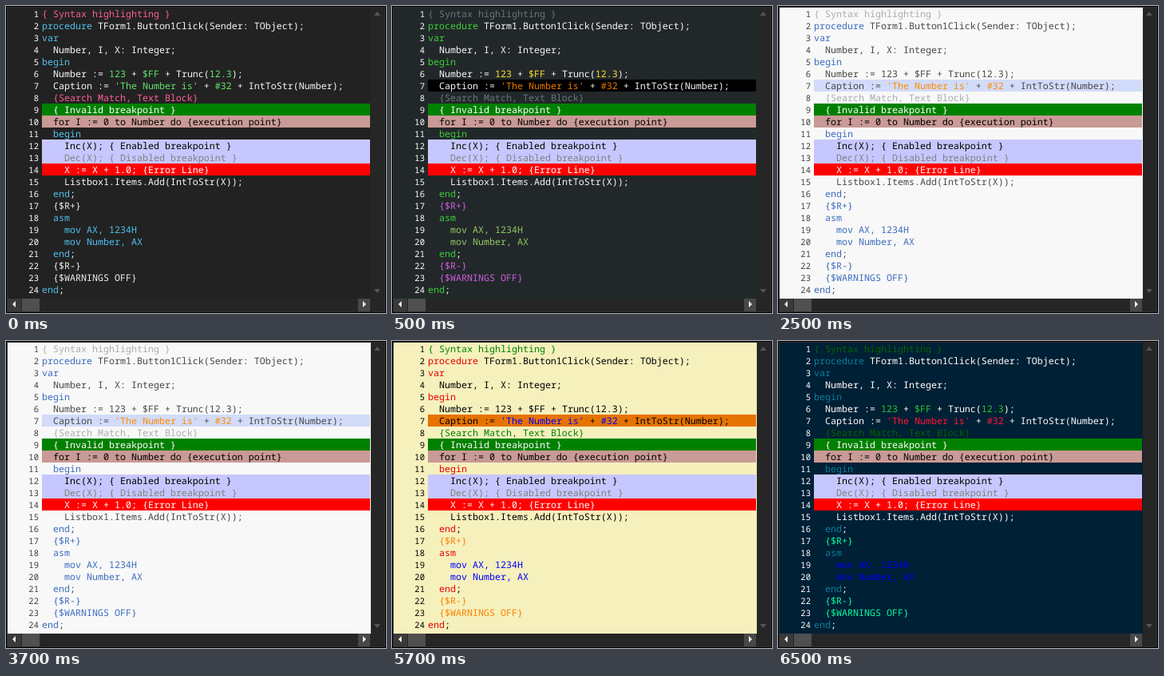
An HTML page for the animation above (8000 ms loop, 476 px wide and 384 px high).

```html
<!DOCTYPE html>
<html lang="en">
<head>
<meta charset="utf-8">
<title>Editor themes</title>
<style>
html, body { margin: 0; width: 100%; height: 100%; overflow: hidden; background: #000; }
svg { display: block; width: 476px; height: 384px; }
text {
  font-family: "Noto Sans Mono", "DejaVu Sans Mono", monospace;
  font-size: 11.667px;
  white-space: pre;
  text-rendering: geometricPrecision;
}
.num { font-size: 10.6px; text-anchor: end; }
</style>
</head>
<body>
<svg id="stage" viewBox="0 0 476 384" xmlns="http://www.w3.org/2000/svg"></svg>
<script>
const LOOP = 8000, ROW = 15, TOP = 2, LEFT = 45, CHAR = 7;
const stage = document.getElementById("stage");

const code = `{ Syntax highlighting }
procedure TForm1.Button1Click(Sender: TObject);
var
  Number, I, X: Integer;
begin
  Number := 123 + $FF + Trunc(12.3);
  Caption := 'The Number is' + #32 + IntToStr(Number);
  {Search Match, Text Block}
  { Invalid breakpoint }
  for I := 0 to Number do {execution point}
  begin
    Inc(X); { Enabled breakpoint }
    Dec(X); { Disabled breakpoint }
    X := X + 1.0; {Error Line}
    Listbox1.Items.Add(IntToStr(X));
  end;
  {$R+}
  asm
    mov AX, 1234H
    mov Number, AX
  end;
  {$R-}
  {$WARNINGS OFF}
end;`.split("\n");

// Rows whose colours are the same in every theme: [background, text]
const marked = {
  9: ["#008000", "#ffffff"],
  10: ["#c99a96", "#000000"],
  12: ["#c7c7ff", "#000000"],
  13: ["#c7c7ff", "#808080"],
  14: ["#ff0000", "#ffffff"]
};

const themes = [
  { at: 0, bg: "#222222", line: "#222222", gutter: "#ffffff", text: "#f8f8f8", key: "#4fc1f0",
    comment: "#ff5c9a", number: "#62e46c", string: "#62e46c", directive: "#f0f0f0", asm: "#4fc1f0" },
  { at: 500, bg: "#22282a", line: "#000000", gutter: "#ffffff", text: "#f8f8f8", key: "#3ad03a",
    comment: "#66747b", number: "#ffdc30", string: "#ec7600", directive: "#d05ce0", asm: "#93c763" },
  { at: 2500, bg: "#f8f8f8", line: "#d2dcfa", gutter: "#404040", text: "#484848", key: "#3c6cbe",
    comment: "#adadad", number: "#484848", string: "#ff8c00", directive: "#3c6cbe", asm: "#3c6cbe" },
  { at: 4500, bg: "#f5f0bc", line: "#e67300", gutter: "#000000", text: "#000000", key: "#ee0000",
    comment: "#008000", number: "#000000", string: "#0000ff", directive: "#ff8000", asm: "#0000ff" },
  { at: 6500, bg: "#002035", line: "#002035", gutter: "#ffffff", text: "#ffffff", key: "#087f9c",
    comment: "#006400", number: "#28c828", string: "#ff1438", directive: "#00ffa0", asm: "#0000ff" }
];

const token = /(?<directive>\{\$[^}]*\})|(?<comment>\{[^}]*\})|(?<string>'[^']*'|#\d+)|(?<number>\$[0-9A-F]+|\b\d+(?:\.\d+)?\b)|(?<key>\b(?:procedure|var|begin|end|asm)\b)/g;

function add(parent, tag, attrs, content) {
  const el = document.createElementNS("http://www.w3.org/2000/svg", tag);
  for (const name in attrs) el.setAttribute(name, attrs[name]);
  if (content) el.textContent = content;
  return parent.appendChild(el);
}

function rect(x, y, width, height, fill) {
  return add(stage, "rect", { x, y, width, height, fill });
}

const painted = [];
function themed(el, role) {
  painted.push([el, role]);
  return el;
}

function rowRect(n, fill) {
  return rect(LEFT, TOP + (n - 1) * ROW, 456 - LEFT, ROW, fill);
}

function drawRow(source, n) {
  const y = TOP + (n - 1) * ROW + 12;
  themed(add(stage, "text", { class: "num", x: 41, y: y - 0.5 }, String(n)), "gutter");
  const body = source.trimStart();
  const x = LEFT + (source.length - body.length) * CHAR;
  const text = add(stage, "text", { x, y });
  if (marked[n]) {
    text.setAttribute("fill", marked[n][1]);
    text.textContent = body;
    return;
  }
  const span = (part, role) => part && themed(add(text, "tspan", {}, part), role);
  if (n === 19 || n === 20) {
    span(body, "asm");
    return;
  }
  let end = 0;
  for (const m of body.matchAll(token)) {
    span(body.slice(end, m.index), "text");
    span(m[0], Object.keys(m.groups).find(k => m.groups[k]));
    end = m.index + m[0].length;
  }
  span(body.slice(end), "text");
}

function drawFrame() {
  rect(0, 0, 476, 384, "#000000");
  rect(1, 1, 474, 382, "#303030");
  rect(2, 2, 472, 380, "#262626");
}

function drawScrollbars() {
  const arrow = (d, fill) => add(stage, "path", { d, fill });
  rect(457, 2, 17, 363, "#262626");
  arrow("M461 12l4-5 4 5z", "#555555");
  arrow("M461 354l4 5 4-5z", "#555555");
  rect(2, 366, 455, 16, "#262626");
  rect(2, 366, 17, 16, "#3a3a3a");
  rect(20, 366, 22, 16, "#505050");
  rect(441, 366, 15, 16, "#484848");
  arrow("M12 369v8l-4-4z", "#f0f0f0");
  arrow("M447 369v8l4-4z", "#f0f0f0");
}

drawFrame();
themed(rect(2, 2, 455, 364, "none"), "bg");
themed(rowRect(7, "none"), "line");
for (const n in marked) rowRect(+n, marked[n][0]);
code.forEach((source, i) => drawRow(source, i + 1));
drawScrollbars();

let current;
function draw(time) {
  const t = time % LOOP;
  const theme = themes.filter(item => item.at <= t).pop();
  if (theme === current) return;
  current = theme;
  for (const [el, role] of painted) el.setAttribute("fill", theme[role]);
}

const start = performance.now();
function tick() {
  draw(performance.now() - start);
  requestAnimationFrame(tick);
}
tick();
</script>
</body>
</html>
```
